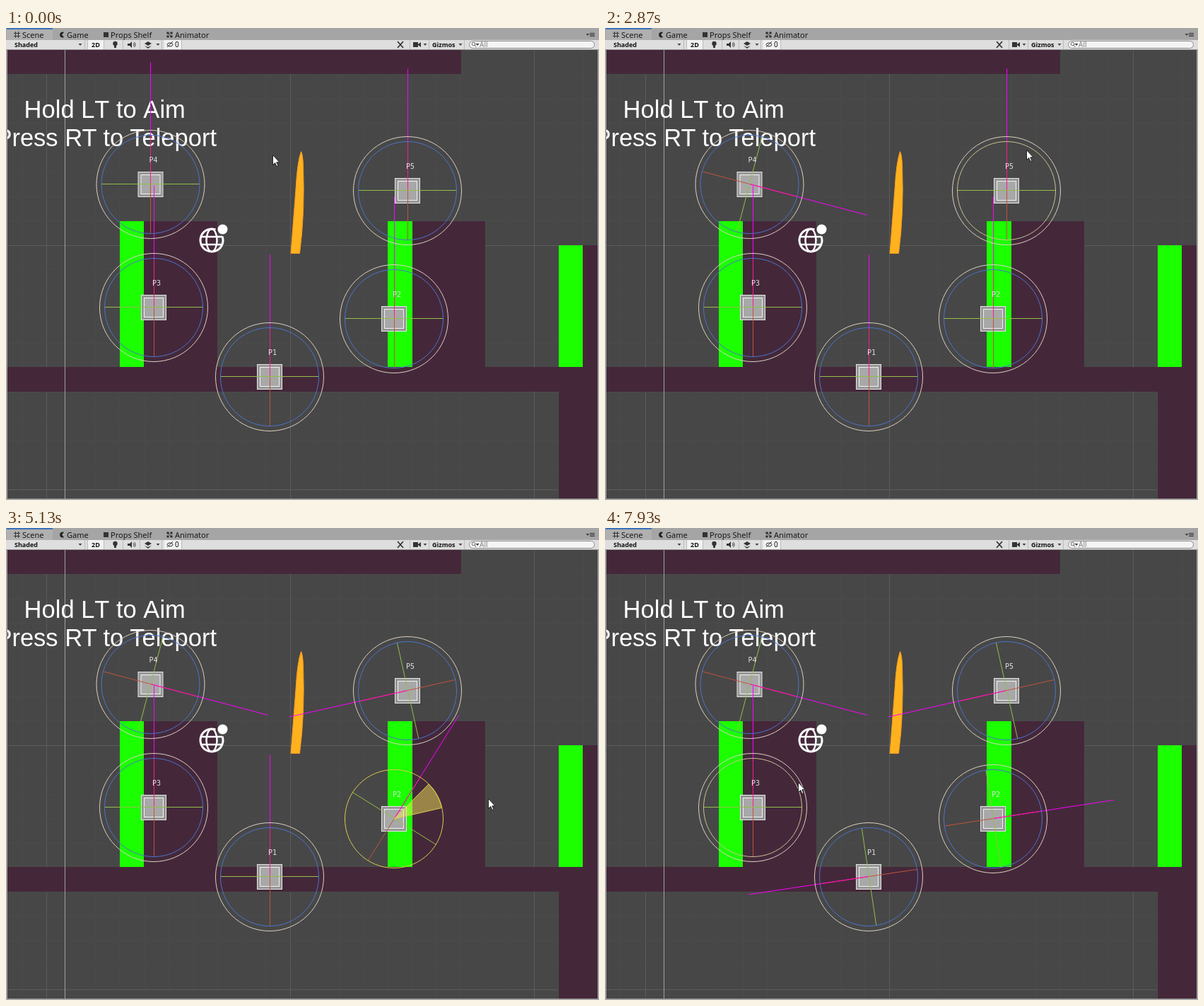
Animation of 839 by 667 pixels, one loop 8000 ms. Source, as an HTML page with a canvas:

```html
<!DOCTYPE html>
<html lang="en">
<head>
<meta charset="utf-8">
<title>Scene view rotation handles</title>
<style>
html, body { margin: 0; width: 100%; height: 100%; overflow: hidden; background: #474747; }
canvas { display: block; }
</style>
</head>
<body>
<canvas id="stage" width="839" height="667"></canvas>
<script>
const ctx = document.getElementById('stage').getContext('2d');
const LOOP = 8000, STEP = 1000 / 15, RAY = 172, OUTER = 76.5, INNER = 69.5;
const UI = '"Noto Sans", sans-serif', BIG = '"Liberation Sans", Arial, sans-serif';
const PURPLE = '#44283a', GREEN = '#1cff00', YELLOW = '#dccb4e', CREAM = '#dcd0c2';
const rad = degrees => degrees * Math.PI / 180;

// turn: [time, degrees]; hover and drag: [start, end]; grab: where the ring is held.
const portals = [
  { name: 'P1', x: 373, y: 493, grab: 66.5, hover: [5990, 6260], drag: [6260, 7190],
    turn: [[6200, 0], [6930, -67], [7130, -98.5]] },
  { name: 'P2', x: 549, y: 411, grab: 45, hover: [4260, 4920], drag: [4920, 5660],
    turn: [[4870, 0], [5530, 81.3]] },
  { name: 'P3', x: 209, y: 395, hover: [7790, 8000], turn: [[0, 0]] },
  { name: 'P4', x: 204.5, y: 221, grab: 36.7, drag: [1320, 2390], outer: true,
    turn: [[1470, 0], [1870, 30.2], [2330, 104.8]] },
  { name: 'P5', x: 568, y: 230, grab: 26, hover: [2730, 3260], drag: [3260, 4060],
    turn: [[3200, 0], [3930, -102.6]] }
];
const pointer = [
  [0, 377, 180], [70, 375, 176], [400, 318, 108], [870, 266, 140], [1330, 250, 159],
  [1470, 250, 159], [1870, 346, 184], [2330, 511, 270], [2470, 525, 255], [2870, 596, 173],
  [3130, 599, 168], [3200, 599, 168], [3930, 335, 152], [4000, 335, 152], [4330, 564, 354],
  [4870, 598, 362], [5530, 810, 416], [5600, 810, 416], [5730, 768, 460], [6070, 436, 464],
  [6200, 436, 464], [6930, 154, 408], [7070, 66, 374], [7130, 38, 366], [7270, 40, 366],
  [7930, 273, 360]
];

function at(keys, t) {
  const next = keys.findIndex(key => key[0] > t);
  if (next < 0) return keys[keys.length - 1].slice(1);
  if (next === 0) return keys[0].slice(1);
  const a = keys[next - 1], b = keys[next], k = (t - a[0]) / (b[0] - a[0]);
  return a.slice(1).map((v, i) => v + (b[i + 1] - v) * k);
}
const within = (span, t) => span && t >= span[0] && t < span[1];

function rect(x, y, w, h, color) {
  ctx.fillStyle = color;
  ctx.fillRect(x, y, w, h);
}
function line(x1, y1, x2, y2, color, width = 1) {
  ctx.beginPath();
  ctx.moveTo(x1, y1);
  ctx.lineTo(x2, y2);
  ctx.strokeStyle = color;
  ctx.lineWidth = width;
  ctx.stroke();
}
function ring(x, y, rx, color, width = 1, ry = rx) {
  ctx.beginPath();
  ctx.ellipse(x, y, rx, ry, 0, 0, 7);
  ctx.strokeStyle = color;
  ctx.lineWidth = width;
  ctx.stroke();
}
function dot(x, y, r, color) {
  ctx.beginPath();
  ctx.arc(x, y, r, 0, 7);
  ctx.fillStyle = color;
  ctx.fill();
}
function text(s, x, y, font, color, align = 'left') {
  ctx.font = font;
  ctx.textAlign = align;
  ctx.fillStyle = color;
  ctx.fillText(s, x, y);
}
function shape(d, fill, stroke) {
  const path = new Path2D(d);
  ctx.fillStyle = fill;
  ctx.fill(path);
  if (stroke) {
    ctx.strokeStyle = stroke;
    ctx.lineWidth = 1;
    ctx.stroke(path);
  }
}
const arrow = (x, y) => shape(`M${x - 2.5} ${y - 1}h5l-2.5 3z`, '#444');

function drawWorld() {
  rect(0, 0, 839, 667, '#474747');
  for (let i = -1; i < 24; i++) {
    const x = Math.floor(57 + i * 34.5) + .5, y = Math.floor(307 + (i - 8) * 34.5) + .5;
    line(x, 31, x, 665, i % 10 ? '#4a4a4a' : '#5c5c5c');
    line(2, y, 837, y, (i - 8) % 10 ? '#4a4a4a' : '#5c5c5c');
  }
  rect(2, 31, 642, 34, PURPLE);
  rect(195, 273, 104, 206, PURPLE);
  rect(575, 273, 103, 206, PURPLE);
  rect(2, 479, 835, 35, PURPLE);
  rect(816, 307, 21, 358, PURPLE);
  rect(782, 479, 55, 186, PURPLE);
  rect(161, 273, 34, 206, GREEN);
  rect(540, 273, 35, 206, GREEN);
  rect(782, 307, 34, 172, GREEN);
  line(83.5, 31, 83.5, 665, '#a0a0a0');

  shape('M417.500 174.500Q412 190 410 228L403 318.500H415.500Q423 262 420.500 195Q420 179 417.500 174.500Z',
    '#ffb21e', '#f99a1e');
  ctx.fontKerning = 'none';
  text('Hold LT to Aim', 139.7, 127, '34.5px ' + BIG, '#fff', 'center');
  ctx.fontKerning = 'normal';
  text('Press RT to Teleport', 298, 167, '34.5px ' + BIG, '#fff', 'right');
}

function drawGlobe() {
  ctx.beginPath();
  ctx.arc(291, 300, 16, rad(-20), rad(290));
  ctx.strokeStyle = '#fff';
  ctx.lineWidth = 3;
  ctx.stroke();
  ring(291, 300, 7.5, '#fff', 2.5, 16);
  line(276, 295, 306, 295, '#fff', 2.5);
  line(276, 306, 306, 306, '#fff', 2.5);
  dot(306.5, 284.5, 7, '#fff');
}

function drawSquare({ x, y }) {
  for (const [half, fill, edge] of [[17.5, '#969696', '#e6e6e6'], [13.5, '#a8a8a8', '#f2f2f2']]) {
    rect(x - half, y - half, half * 2, half * 2, fill);
    ctx.strokeStyle = edge;
    ctx.lineWidth = 1;
    ctx.strokeRect(x - half, y - half, half * 2, half * 2);
  }
}

function drawHandle(p, t) {
  const turn = at(p.turn, t)[0], dragging = within(p.drag, t);
  const ux = Math.sin(rad(turn)), uy = -Math.cos(rad(turn));
  // The axes run through the middle of a pixel so that upright lines stay sharp.
  const cx = Math.floor(p.x) + .5, cy = p.y - .5;
  const axis = (dx, dy, from, to, color) =>
    line(cx + dx * from, cy + dy * from, cx + dx * to, cy + dy * to, color);

  axis(ux, uy, 0, RAY, '#f0f');
  axis(ux, uy, -INNER, 0, '#c0533c');
  axis(ux, uy, 0, INNER, '#ff1a90');
  axis(-uy, ux, -INNER, INNER, '#93bf4a');

  if (!dragging || p.outer) ring(p.x, p.y, OUTER, dragging ? YELLOW : CREAM);
  const innerColor = dragging && !p.outer ? YELLOW : within(p.hover, t) ? '#cbc193' : '#4a74cc';
  ring(p.x, p.y, INNER, innerColor);

  if (dragging && turn) {
    ctx.beginPath();
    ctx.moveTo(p.x, p.y);
    ctx.arc(p.x, p.y, p.outer ? OUTER : INNER, rad(p.grab - 90), rad(p.grab + turn - 90), turn < 0);
    ctx.closePath();
    ctx.fillStyle = 'rgba(255,240,90,.46)';
    ctx.fill();
    ctx.strokeStyle = YELLOW;
    ctx.lineWidth = 1;
    ctx.stroke();
  }
  text(p.name, p.x + 4, p.y - 31.5, '10px "DejaVu Sans Mono", monospace', '#dedede', 'center');
}

function drawTabs() {
  rect(0, 0, 839, 17, '#a5a5a5');
  rect(1, 0, 65, 17, '#b0b0b0');
  rect(1, 0, 65, 2, '#3a72b8');
  for (const d of [0, 4]) {
    line(13.5 + d, 5, 13.5 + d, 14, '#333');
    line(11, 7.5 + d, 20, 7.5 + d, '#333');
  }
  shape('M82 6A4 4 0 1 0 82 13L79 9.500Z', '#222');
  rect(138, 6, 7, 7, '#333');
  [[229, 7], [234, 7], [229, 12], [234, 12]].forEach(([x, y]) => dot(x, y, 1.8, '#333'));
  line(229, 7, 234, 12, '#333');
  [['Scene', 23], ['Game', 86], ['Props Shelf', 148], ['Animator', 239]]
    .forEach(([s, x]) => text(s, x, 13.5, '11px ' + UI, '#181818'));
  for (const y of [7.5, 9.5, 11.5]) line(826, y, 833, y, '#333');
  arrow(823, 9);
}

function drawToolbar() {
  rect(0, 17, 839, 14, '#dedede');
  rect(0, 30, 839, 1, '#a0a0a0');
  [111, 115, 138, 165, 189, 220, 248, 571, 598, 648]
    .forEach(x => line(x + .5, 17, x + .5, 30, '#bcbcbc'));
  rect(116, 17, 22, 13, '#f2f2f2');
  rect(224, 17, 24, 13, '#f2f2f2');
  [['Shaded', 12], ['2D', 121], ['Gizmos', 603]]
    .forEach(([s, x]) => text(s, x, 27, 'bold 9px ' + UI, '#111'));
  [105, 215, 593, 643].forEach(x => arrow(x, 23));
  dot(154.5, 22, 3.2, '#333');
  rect(153, 25, 3, 3, '#333');
  shape('M172 22h3l3-3v9l-3-3h-3z', '#333');
  for (const r of [3, 5]) {
    ctx.beginPath();
    ctx.arc(178, 23.5, r, -.8, .8);
    ctx.strokeStyle = '#333';
    ctx.stroke();
  }
  shape('M196 22l5-3 5 3-5 3zM196 25l5 2 5-2-5 4z', '#333');
  ring(232, 23.5, 4, '#333', 1, 2.5);
  line(228, 27, 236, 19, '#333');
  text('0', 239, 27, '10px ' + UI, '#111');
  line(554, 19, 562, 28, '#333', 1.7);
  line(562, 19, 554, 28, '#333', 1.7);
  shape('M576 20h7v7h-7zM583 23l4-3v7l-4-3z', '#333');

  ctx.beginPath();
  ctx.roundRect(655.5, 18.5, 177, 10, 5);
  ctx.fillStyle = '#f4f4f4';
  ctx.fill();
  ctx.strokeStyle = '#8c8c8c';
  ctx.lineWidth = 1;
  ctx.stroke();
  ring(661.5, 22.5, 2.3, '#666');
  line(663, 24, 665, 27, '#666');
  arrow(667, 23);
  text('All', 670, 27, '10px ' + UI, '#858585');
}

function drawFrame() {
  rect(0, 31, 2, 636, '#a2a2a2');
  rect(837, 31, 2, 636, '#a2a2a2');
  rect(0, 665, 839, 2, '#a2a2a2');
}

function drawPointer([x, y]) {
  ctx.save();
  ctx.translate(Math.round(x) + .5, Math.round(y) - .5);
  shape('M0 0V14L3.200 11L5.500 16L7.500 15L5.300 10.300H9.500Z', '#fff', '#222');
  ctx.restore();
}

function draw(now) {
  // Fifteen poses a second, on whole hundredths.
  const pose = Math.floor((now % LOOP) / STEP + .1);
  const t = Math.round(pose * STEP / 10) * 10;
  drawWorld();
  drawGlobe();
  portals.forEach(drawSquare);
  portals.forEach(p => drawHandle(p, t));
  drawTabs();
  drawToolbar();
  drawFrame();
  drawPointer(at(pointer, t));
}

const start = performance.now();
function tick() {
  draw(performance.now() - start);
  requestAnimationFrame(tick);
}
tick();
</script>
</body>
</html>
```
